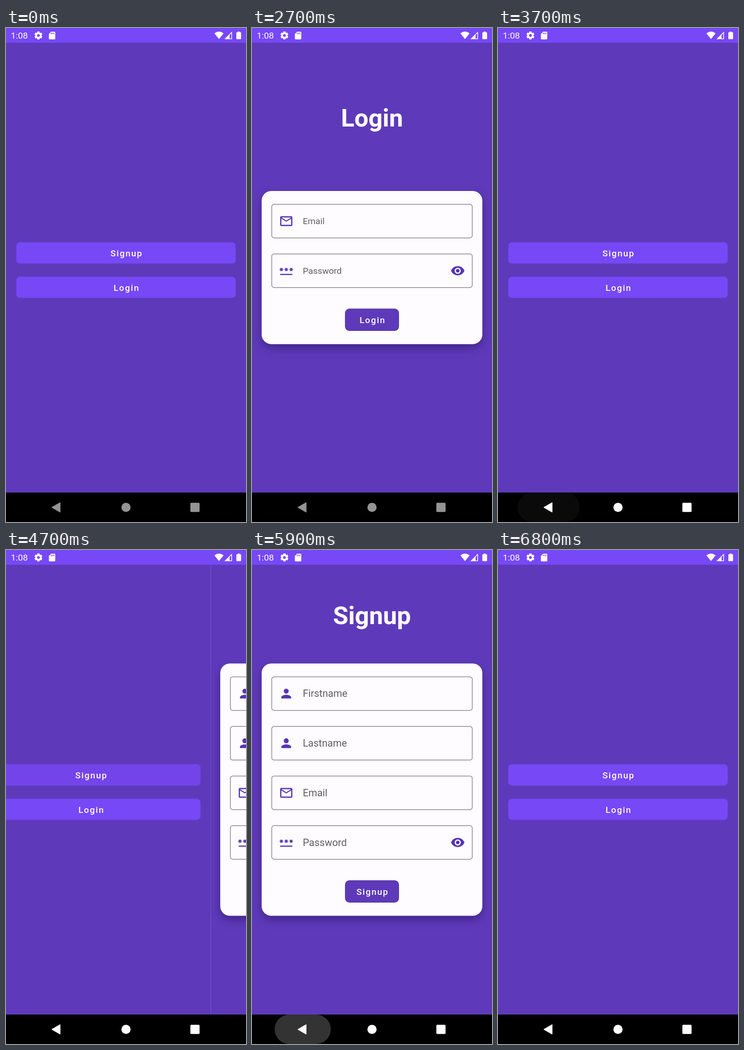
Write an HTML page that moves like this. It is 522x1073 px and loops after 6900 ms.

```html
<!DOCTYPE html>
<html lang="en">
<head>
<meta charset="utf-8">
<title>Login and signup</title>
<style>
  html, body { margin: 0; width: 100%; height: 100%; overflow: hidden; background: #5e3aba; }
  svg { display: block; width: 100vw; height: 100vh; }
  text { font-family: Roboto, sans-serif; fill: #fff; }
  .title { font-size: 54px; font-weight: 700; text-anchor: middle; }
  .btn { font-size: 19px; font-weight: 500; letter-spacing: .1em; text-anchor: middle; }
  .hint { fill: #615d63; }
  .card { filter: drop-shadow(0 9px 10px rgba(20, 5, 60, .38)); }
</style>
</head>
<body>
<svg id="stage" viewBox="0 0 522 1073"></svg>
<script>
const W = 522, LOOP = 6900, STEP = 100;
const BG = '#5e3aba', BRIGHT = '#7748f6', PRESSED = '#7444eb', INK = '#5635b5';

const ICONS = {
  person: 'M12 12c2.21 0 4-1.79 4-4s-1.79-4-4-4-4 1.79-4 4 1.79 4 4 4zm0 2c-2.67 0-8 1.34-8 4v2h16v-2c0-2.66-5.33-4-8-4z',
  mail: 'M22 6c0-1.1-.9-2-2-2H4c-1.1 0-2 .9-2 2v12c0 1.1.9 2 2 2h16c1.1 0 2-.9 2-2V6zm-2 0l-8 5-8-5h16zm0 12H4V8l8 5 8-5v10z',
  eye: 'M12 4.5C7 4.5 2.73 7.61 1 12c1.73 4.39 6 7.5 11 7.5s9.27-3.11 11-7.5c-1.73-4.39-6-7.5-11-7.5zM12 17c-2.76 0-5-2.24-5-5s2.24-5 5-5 5 2.24 5 5-2.24 5-5 5zm0-8c-1.66 0-3 1.34-3 3s1.34 3 3 3 3-1.34 3-3-1.34-3-3-3z'
};
const star = x => `M${x + 3.15} 12.95l.85-1.48.85 1.48 1.3-.75-.85-1.48h1.7v-1.5h-1.7l.85-1.47-1.3-.75-.85 1.47-.85-1.47-1.3.75.85 1.47h-1.7v1.5h1.7l-.85 1.48z`;
ICONS.password = 'M2 17h20v2H2z' + [0, 8, 16].map(star).join('');

const rect = (x, y, w, h, r, fill, more = '') =>
  `<rect x="${x}" y="${y}" width="${w}" height="${h}" rx="${r}" fill="${fill}" ${more}/>`;
const text = (cls, x, y, s, more = '') => `<text class="${cls}" x="${x}" y="${y}" ${more}>${s}</text>`;
const icon = (name, cx, cy) =>
  `<path transform="translate(${cx} ${cy}) scale(1.33) translate(-12 -12)" fill="${INK}" d="${ICONS[name]}"/>`;

const wideButton = (id, y, label) =>
  rect(22.5, y, 477, 46, 8, BRIGHT, `id="${id}" stroke="#6c41dc"`) + text('btn', 262.3, y + 30.6, label);

// cy is the vertical centre of the box
const field = (cy, label, name, size) =>
  rect(43, cy - 36.5, 436, 73, 5, 'none', 'stroke="#89858b" stroke-width="1.5"') +
  icon(name, 74.5, cy) +
  text('hint', 110.4, cy + size * .345, label, `font-size="${size}"`) +
  (name === 'password' ? icon('eye', 447.5, cy) : '');

function form(id, title, titleY, top, bottom, size, fields) {
  const by = bottom - 76.5;
  return `<g id="${id}">` +
    rect(0, 32, W, 977, 0, BG) +
    rect(0, 32, 1, 977, 0, '#7252c6', 'class="edge"') +
    text('title', 261, titleY, title) +
    rect(21, top, 480, bottom - top, 21, '#fefcff', 'class="card"') +
    fields.map(([label, name], i) => field(top + 65.5 + i * 107.8, label, name, size)).join('') +
    rect(203, by, 116, 47, 9, BG, 'stroke="#472b9c" stroke-width="1.3"') +
    text('btn', 262.3, by + 31, title) + '</g>';
}

const teeth = [0, 60, 120, 180, 240, 300].map(a =>
  rect(-2.6, -8.6, 5.2, 4, .7, '#fff', `transform="rotate(${a})"`)).join('');

const statusBar = rect(0, 0, W, 32, 0, BRIGHT) +
  text('', 10.5, 23.2, '1:08', 'font-size="19.2"') +
  `<g transform="translate(70.5 16.2)">${teeth}<circle r="4.9" fill="none" stroke="#fff" stroke-width="3.8"/></g>
  <path fill="#fff" d="M98.2 8H105.5Q107.2 8 107.2 9.7V23Q107.2 24.7 105.5 24.7H95Q93.3 24.7 93.3 23V13z"/>
  <path stroke="${BRIGHT}" stroke-width="1.5" d="M98.4 10v3.6M101.4 10v3.6M104.4 10v3.6"/>
  <path fill="#fff" d="M463.3 24L453.3 11.7Q463.3 3.6 473.3 11.7z"/>
  <path fill="#fff" fill-rule="evenodd" d="M475 24.3L491.5 7.7V24.3zM486.3 15.2V22.7H489.9V11.6z"/>
  <path fill="#fff" d="M504 9.2V7.7H508.2V9.2H510Q511.3 9.2 511.3 10.5V23Q511.3 24.3 510 24.3H502.3Q501 24.3 501 23V10.5Q501 9.2 502.3 9.2z"/>`;

const navBar = rect(0, 1009, W, 64, 0, '#000') +
  rect(0, 1009, 0, 64, 32, '#fff', 'id="ripple"') +
  `<g id="nav"><path d="M100.2 1041.2L117.6 1031.2V1051.2z" stroke="currentColor" stroke-width="1.6" stroke-linejoin="round" fill="currentColor"/>
  <circle cx="261" cy="1041.2" r="10" fill="currentColor"/>` +
  rect(401, 1031.2, 20, 20, 2, 'currentColor') + '</g>';

document.getElementById('stage').innerHTML =
  rect(0, 0, W, 1073, 0, BG) +
  `<g id="home">${wideButton('homeSignup', 465.5, 'Signup')}${wideButton('homeLogin', 540.2, 'Login')}</g>` +
  form('login', 'Login', 214, 354, 686.7, 19.2,
    [['Email', 'mail'], ['Password', 'password']]) +
  form('signup', 'Signup', 161, 246.4, 794.6, 21.7,
    [['Firstname', 'person'], ['Lastname', 'person'], ['Email', 'mail'], ['Password', 'password']]) +
  statusBar + navBar;

// time, form shown, form x, pressed button, ripple width, ripple alpha
const STEPS = [
  [0, '', W, '', 0, 0],
  [1900, '', W, 'homeLogin', 0, 0],
  [2000, 'login', 0, '', 0, 0],
  [3500, 'login', 0, '', 122, .2],
  [3600, 'login', 200, '', 130, .11],
  [3700, '', W, '', 135, .04],
  [3800, '', W, '', 0, 0],
  [4600, '', W, 'homeSignup', 0, 0],
  [4700, 'signup', 445, 'homeSignup', 0, 0],
  [4800, 'signup', 0, '', 0, 0],
  [5900, 'signup', 0, '', 122, .2],
  [6000, 'signup', 200, '', 130, .11],
  [6100, '', W, '', 135, .04],
  [6200, '', W, '', 0, 0]
];
const NAV_WAKES = 3500;

const el = id => document.getElementById(id);
const edges = document.querySelectorAll('.edge');

function draw(t) {
  const [, shown, x, pressed, rw, ra] = STEPS.filter(s => s[0] <= t).pop();
  for (const id of ['login', 'signup']) {
    el(id).style.display = id === shown ? '' : 'none';
    el(id).setAttribute('transform', `translate(${x} 0)`);
  }
  edges.forEach(e => e.style.display = x ? '' : 'none');
  el('home').style.display = x ? '' : 'none';
  el('home').setAttribute('transform', `translate(${x - W + (x < W ? .5 : 0)} 0)`);
  for (const id of ['homeLogin', 'homeSignup'])
    el(id).setAttribute('fill', id === pressed ? PRESSED : BRIGHT);
  const ripple = el('ripple');
  ripple.setAttribute('x', 110.3 - rw / 2);
  ripple.setAttribute('width', rw);
  ripple.setAttribute('opacity', ra);
  el('nav').style.color = t < NAV_WAKES ? '#949494' : '#fff';
}

const start = performance.now();
function tick() {
  const t = (performance.now() - start) % LOOP;
  draw(Math.floor(t / STEP) * STEP);
  requestAnimationFrame(tick);
}
tick();
</script>
</body>
</html>
```
